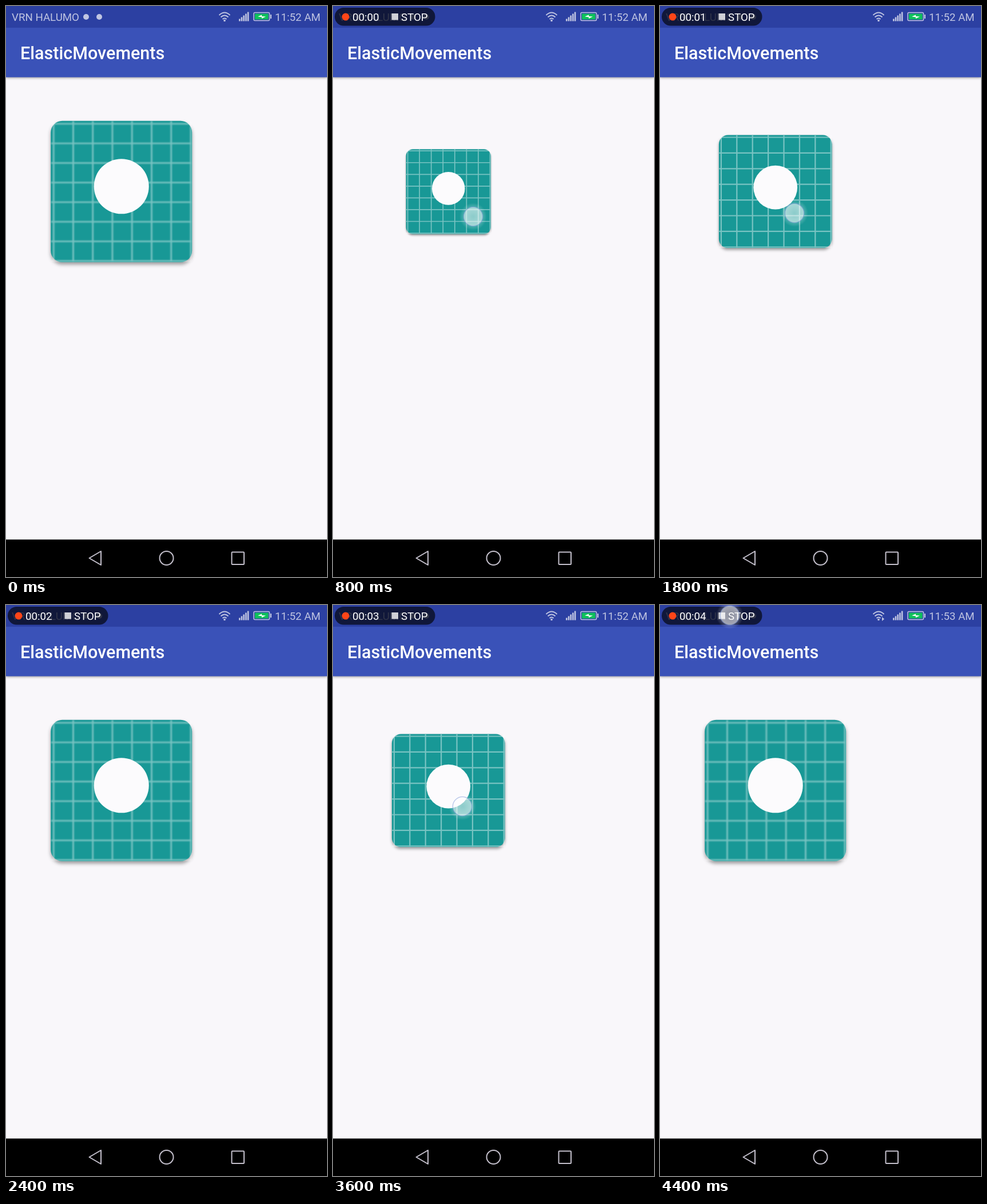
Write an HTML page that moves like this. It is 561 px wide and 998 px high and loops after 4500 ms.

```html
<!DOCTYPE html>
<html lang="en">
<head>
<meta charset="utf-8">
<title>Spring scale demo</title>
<style>
  html, body { margin: 0; height: 100%; overflow: hidden; background: #f9f7fa; }
  svg { display: block; width: 561px; height: 998px; font: 18.7px Roboto, Arial, sans-serif; }
  .bar { filter: drop-shadow(0 1.5px 2px rgba(0, 0, 0, .4)); }
  .tile { filter: blur(.6px) drop-shadow(0 4px 3px rgba(0, 0, 0, .38)); }
  #grid { filter: blur(.9px); }
  .line { fill: none; stroke: #c4c0cc; stroke-width: 2; }
  .status { fill: #c0c5e2; }
</style>
</head>
<body>
<svg viewBox="0 0 561 998">
  <defs>
    <radialGradient id="glow">
      <stop offset="0" stop-color="#fff" stop-opacity=".5"/>
      <stop offset=".66" stop-color="#fff" stop-opacity=".62"/>
      <stop offset=".72" stop-color="#fff" stop-opacity=".2"/>
      <stop offset="1" stop-color="#fff" stop-opacity="0"/>
    </radialGradient>
  </defs>
  <rect width="561" height="998" fill="#f9f7fa"/>
  <rect class="bar" y="38" width="561" height="86.500" fill="#3a52b8"/>
  <rect width="561" height="38" fill="#2c40a2"/>
  <text x="25" y="93" fill="#fff" font-size="30.5" font-weight="500">ElasticMovements</text>

  <g class="status">
    <text x="10" y="26">VRN HALUMO</text>
    <circle cx="140" cy="19" r="5"/>
    <circle cx="163" cy="19" r="5"/>
    <g fill="none" stroke="#c0c5e2" stroke-width="2">
      <path d="M372.500 16q9.500-9 19 0M375.500 19.500q6.500-6 13 0M378.500 23q3.500-3 7 0"/>
      <rect x="433" y="11.500" width="27.500" height="14" rx="2" stroke-width="1.500"/>
    </g>
    <circle cx="382" cy="25.500" r="1.800"/>
    <path id="data" d="M388 21l4 3.500-4 3.500z"/>
    <path id="bars"/>
    <rect x="435" y="13.500" width="23.500" height="10" fill="#0fc15c"/>
    <path d="M440 18.500l7-3v2.500l7 .5-7 3.500v-2.500z" fill="#fff"/>
    <rect x="462" y="15" width="2" height="7"/>
    <text id="clock" x="470" y="26"></text>
  </g>

  <g id="tile">
    <g class="tile"><rect x="-123.500" y="-123.500" width="247" height="247" rx="20" fill="#189896"/></g>
    <path id="grid" stroke="#fff" stroke-opacity=".42" stroke-width="2.800"/>
    <circle cy="-9" r="48" fill="#fcfbfd"/>
  </g>

  <rect y="932.500" width="561" height="66"/>
  <g class="line">
    <path d="M145.500 965L166 953v24z" stroke-linejoin="round"/>
    <circle cx="280.500" cy="965" r="12"/>
    <rect x="394.500" y="954.500" width="21.500" height="21.500" rx="1"/>
  </g>

  <g id="recorder">
    <rect x="3" y="3" width="175.500" height="31.500" rx="15.700" fill="#080c1e" fill-opacity=".78"/>
    <circle cx="22" cy="19" r="6.500" fill="#ff4518"/>
    <rect x="102.500" y="13" width="11.500" height="11.500" fill="#cfd0d6"/>
    <g fill="#fff">
      <text id="count" x="34" y="26"></text>
      <text x="119" y="26">STOP</text>
    </g>
  </g>
  <g id="touch">
    <circle r="24" fill="url(#glow)"/>
    <circle r="16.700" fill="none" stroke="#7f98d8" stroke-opacity=".5" stroke-width="1.500"/>
  </g>
</svg>
<script>
const $ = id => document.getElementById(id);
const LOOP = 4500, STEP = 100, HALF = 80;

// spring: moment the scale is let go, a little around the tap itself
const taps = [
  { at: 800, spring: 720, from: 1, to: .8, x: 245, y: 368 },
  { at: 1800, spring: 1860, from: .8, to: 1, x: 235, y: 362 },
  { at: 2700, spring: 2760, from: 1, to: .8, x: 226, y: 358 },
  { at: 3600, spring: 3660, from: .8, to: 1, x: 226, y: 352 },
  { at: 4300, x: 122, y: 18 }
];

$('grid').setAttribute('d', Array.from({ length: 8 }, (_, i) => {
  const p = -118.500 + 34.250 * i;
  return `M${p}-123v246M-123 ${p}h246`;
}).join(''));
$('bars').setAttribute('d', Array.from({ length: 5 }, (_, i) =>
  `M${407 + i * 3.700} 26.500v${-4 - i * 3}h2.600v${4 + i * 3}z`).join(''));

function scaleAt(t) {
  const tap = taps.filter(p => p.to && t >= p.at).pop();
  if (!tap) return 1;
  if (t >= tap.at + 5 * STEP) return tap.to;
  const u = Math.max(0, t - tap.spring);
  const decay = Math.exp(-.008 * Math.max(0, u - HALF));
  return tap.to + (tap.from - tap.to) * decay * Math.cos(Math.PI * u / HALF);
}

function show(id, on) {
  $(id).style.display = on ? '' : 'none';
}

function draw(now) {
  const t = Math.floor(now % LOOP / STEP) * STEP;
  $('tile').setAttribute('transform', `translate(201.700 324.300) scale(${scaleAt(t)})`);
  $('clock').textContent = t < 3900 ? '11:52 AM' : '11:53 AM';
  $('count').textContent = '00:0' + Math.max(0, Math.floor((t - 400) / 1000));
  show('recorder', t >= 100);
  show('data', t >= 4400);
  const tap = taps.find(p => t >= p.at && t < p.at + 2 * STEP);
  show('touch', tap);
  if (tap) $('touch').setAttribute('transform', `translate(${tap.x} ${tap.y})`);
}

const start = performance.now();
function tick() {
  draw(performance.now() - start);
  requestAnimationFrame(tick);
}
tick();
</script>
</body>
</html>
```
